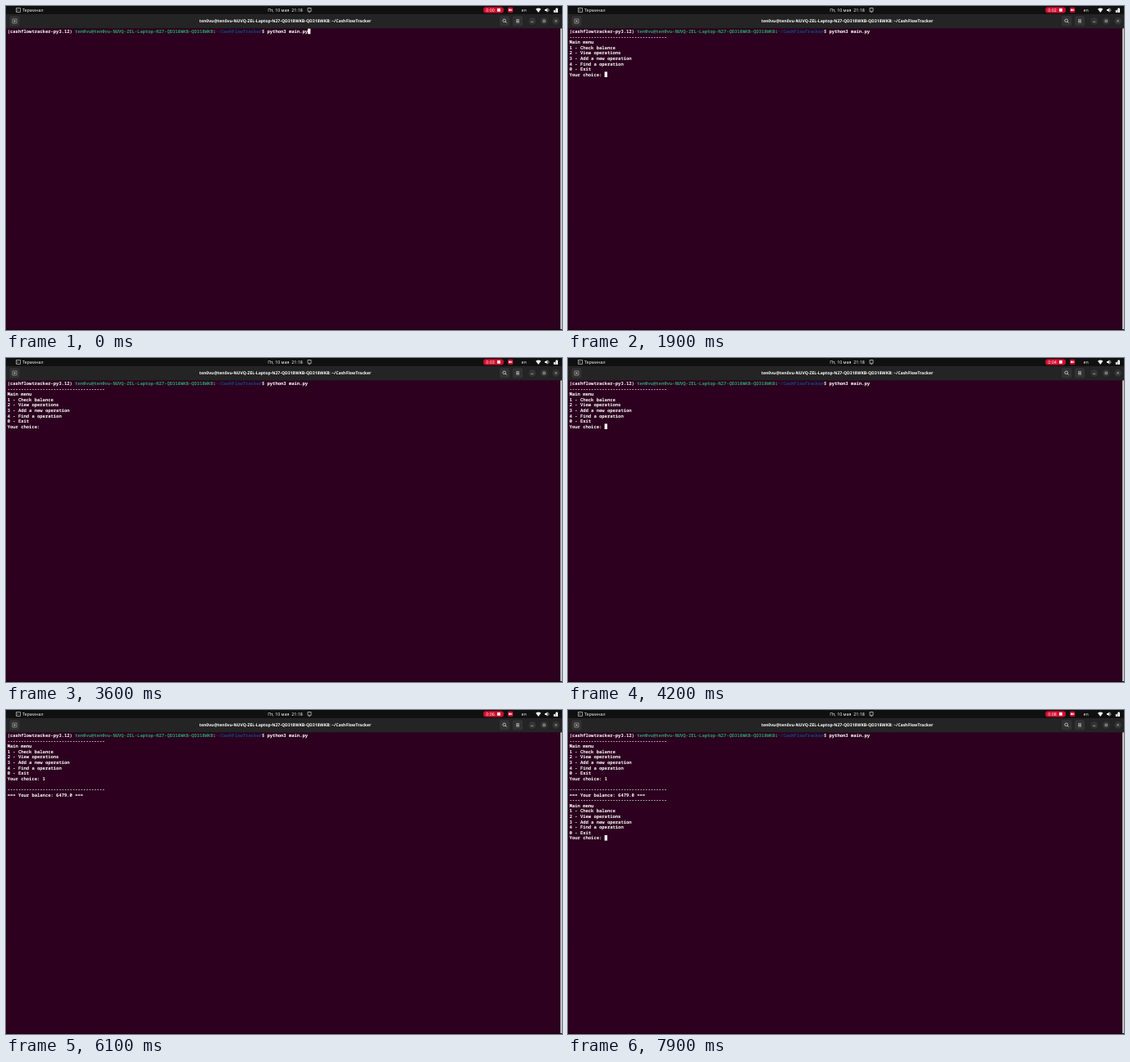
An HTML page with a canvas that plays this animation: 678x396 px, repeating every 8000 ms.

```html
<!DOCTYPE html>
<html lang="ru">
<head>
<meta charset="utf-8">
<title>Терминал</title>
<style>
  html, body { margin: 0; width: 100%; height: 100%; overflow: hidden; background: #2c001e; }
  canvas { display: block; }
</style>
</head>
<body>
<canvas id="stage" width="678" height="396"></canvas>
<script>
const ctx = document.getElementById('stage').getContext('2d');
const LOOP = 8000;
const CELL = 3.3, ROW = 6.6, LEFT = 1.7, TOP = 27.8;
const MONO = '5.5px "Noto Sans Mono", monospace';
const UI = '5.3px "Noto Sans", sans-serif';

const USER = 'ten0vu@ten0vu-NUVQ-ZEL-Laptop-N27-QD318WKB-QD318WKB';
const FOLDER = '~/CashFlowTracker';
const RULE = '-'.repeat(36);
const MENU = [RULE, 'Main menu', '1 - Check balance', '2 - View operations',
  '3 - Add a new operation', '4 - Find a operation', '0 - Exit', 'Your choice: '];

// Terminal output: [time, first row, lines]
const OUTPUT = [
  [1900, 1, MENU],
  [4800, 8, ['Your choice: 1']],
  [5500, 10, [RULE, '=== Your balance: 6479.0 ===']],
  [7500, 12, MENU],
];
// Cursor position: [time, column, row]
const CURSOR = [[0, 111, 0], [1800, 0, 1], [1900, 13, 8], [4800, 14, 8], [5500, 0, 12], [7500, 13, 19]];
// The blink restarts, switched on, at each of these times
const BLINK = [-100, 1800, 4800, 5500];

const latest = (list, t, time = item => item) => list.filter(item => time(item) <= t).pop();

function text(str, x, y, color, font = UI, align = 'left') {
  ctx.font = font;
  ctx.textAlign = align;
  ctx.fillStyle = color;
  ctx.fillText(str, x, y);
}

function box(x, y, w, h, color, r = 0) {
  ctx.fillStyle = color;
  ctx.beginPath();
  ctx.roundRect(x, y, w, h, r);
  ctx.fill();
}

function path(d, color, width) {
  const shape = new Path2D(d);
  if (width) {
    ctx.strokeStyle = color;
    ctx.lineWidth = width;
    ctx.stroke(shape);
  } else {
    ctx.fillStyle = color;
    ctx.fill(shape);
  }
}

function cells(str, col, row, color = '#fff', weight = 600) {
  text(str, LEFT + col * CELL, TOP + row * ROW + 5.2, color, `${weight} ${MONO}`);
}

function topBar(t) {
  box(0, 0, 678, 10, '#101010');
  path('M12.5 2.5h5v5h-5z M13.7 4l1.2 1-1.2 1', '#c8c8c8', 0.7);
  text('Терминал', 20, 6.9, '#f4f4f4');
  text('Пт, 10 мая  21:18', 340.5, 6.9, '#fff', '500 ' + UI, 'center');
  path('M368 2.5h4v4.2h-4z M369.2 7.7h1.6', '#dcdcdc', 0.7);

  box(582, 1.2, 25, 7.4, '#d5092b', 3.7);
  text('0:0' + Math.floor((t + 100) / 1000), 585.3, 6.9, '#fff');
  box(599, 3, 3.8, 3.8, '#fff', 0.4);
  box(612, 1.8, 6.2, 6.2, '#d5092b', 1);
  path('M613 3.7h2.6v2.4h-2.6z M615.8 4.7l1.4-1v2.4l-1.4-1z', '#fff');
  text('en', 628.4, 6.9, '#f4f4f4');
  path('M646 3.8q3.2-2.6 6.4 0L649.2 8z', '#f0f0f0');
  path('M657 4h1.4l2-1.8v5.6l-2-1.8H657z', '#f0f0f0');
  path('M661.4 3.4q1.3 1.6 0 3.2', '#f0f0f0', 0.6);
  path('M667.8 5h2v3h-2z M670.2 3h.8v-.8h1.2V3h.8v5h-2.8z', '#f0f0f0');
}

function headerBar() {
  box(0, 10, 678, 17.2, '#242424');
  for (const [x, w] of [[4.5, 12], [602, 12.2], [617.8, 12.2]]) box(x, 12.3, w, 12.2, '#323232', 2);
  path('M8 16h5v5H8z M10.5 17v3 M9 18.5h3', '#d0d0d0', 0.5);
  text(`${USER}: ${FOLDER}`, 340.5, 20.2, '#fff', 'bold 5.12px "Noto Sans", sans-serif', 'center');
  path('M609.4 17.8a1.8 1.8 0 1 1-3.6 0a1.8 1.8 0 1 1 3.6 0 M609 19.1l1.7 1.7', '#eee', 0.7);
  path('M622 16.8h4 M622 18.4h4 M622 20h4', '#eee', 0.7);
  for (const x of [641.7, 656.2, 670.6]) box(x - 4.3, 14.1, 8.6, 8.6, '#343434', 4.3);
  path('M640.2 19.3h3 M655 17.2h2.4v2.4h-2.4z M669.3 17.1l2.6 2.6 M671.9 17.1l-2.6 2.6', '#ddd', 0.6);
}

function terminal(t) {
  box(0, 27.2, 678, 368.8, '#2c001e');
  box(0, 265, 0.7, 18, '#151015');
  box(676, 27.2, 2, 368, '#c4c0c4');
  box(0, 395, 678, 1, '#16060f');

  cells('(cashflowtracker-py3.12)', 0, 0);
  cells(USER, 25, 0, '#26a269', 700);
  cells(':', 76, 0);
  cells(FOLDER, 77, 0, '#12488b', 700);
  cells('$ python3 main.py', 94, 0);

  const rows = [];
  for (const [time, first, lines] of OUTPUT) {
    if (time <= t) lines.forEach((line, i) => rows[first + i] = line);
  }
  rows.forEach((line, row) => cells(line, 0, row));

  const on = Math.floor((t - latest(BLINK, t)) / 600) % 2 === 0;
  if (on) {
    const [, col, row] = latest(CURSOR, t, item => item[0]);
    box(LEFT + col * CELL, TOP + row * ROW - 0.2, CELL, ROW, '#fff');
  }
}

function draw(now) {
  const t = now % LOOP;
  ctx.textRendering = 'geometricPrecision';
  terminal(t);
  headerBar();
  topBar(t);
  requestAnimationFrame(draw);
}
requestAnimationFrame(draw);
</script>
</body>
</html>
```
